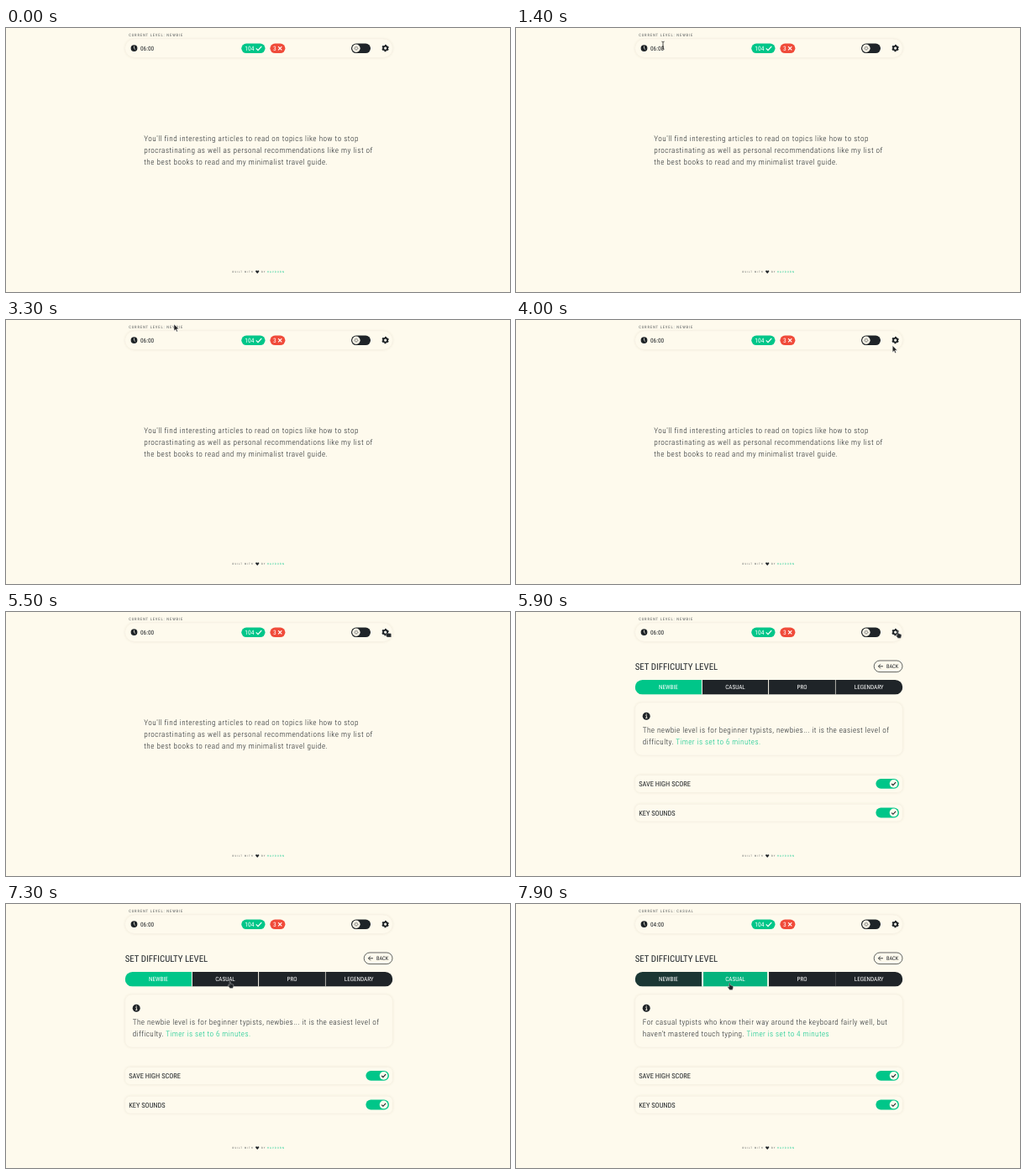
An HTML page for the animation above (8 s loop, 600x315 px).

```html
<!DOCTYPE html>
<html lang="en">
<head>
<meta charset="utf-8">
<title>Typing trainer</title>
<style>
  html, body { margin: 0; width: 100%; height: 100%; overflow: hidden; background: #fefaed; }
  svg { display: block; width: 100vw; height: 100vh; }
  text {
    font-family: "Roboto Condensed", Roboto, sans-serif;
    font-stretch: condensed;
    text-rendering: geometricPrecision;
    white-space: pre;
  }
</style>
</head>
<body>
<svg id="stage" viewBox="0 0 600 315"></svg>
<script>
const LOOP = 8000, STEP = 100;
const CREAM = '#fefaed', DARK = '#1f2428', GREY = '#565a5b', GREEN = '#00c689', RED = '#f04b3a';
const FAMILY = '"Roboto Condensed", Roboto, sans-serif';

// Where no condensed face is available, all text shares one narrowing factor.
function condenseFactor() {
  const ctx = document.createElement('canvas').getContext('2d');
  const width = font => { ctx.font = font; return ctx.measureText('procrastinating').width; };
  return width('condensed 40px ' + FAMILY) < 0.95 * width('40px Roboto, sans-serif') ? 1 : 0.88;
}
const narrow = condenseFactor();

function text(x, y, content, { size = 7.2, gap = 0, weight = 400, fill = DARK, anchor = 'start', id = '' } = {}) {
  return `<text id="${id}" transform="translate(${x} ${y}) scale(${narrow} 1)" font-size="${size}"
    letter-spacing="${gap / narrow}" font-weight="${weight}" fill="${fill}" text-anchor="${anchor}">${content}</text>`;
}
const rect = (x, y, w, h, r, attrs) =>
  `<rect x="${x}" y="${y}" width="${w}" height="${h}" rx="${r}" ${attrs}/>`;
const circle = (x, y, r, attrs) => `<circle cx="${x}" cy="${y}" r="${r}" ${attrs}/>`;
const line = (d, color, width, attrs = '') =>
  `<path d="${d}" fill="none" stroke="${color}" stroke-width="${width}" ${attrs}/>`;
const panel = (y, h, r) =>
  rect(141.7, y, 318.6, h, r, `fill="${CREAM}" stroke="#f5efe1" stroke-width=".5" filter="url(#soft)"`);

function header() {
  const rays = Array.from({ length: 8 }, (_, i) =>
    `<path d="M0-2.3V-3.1" transform="rotate(${i * 45})"/>`).join('');
  return text(146.2, 10.3, '', { size: 4.6, gap: 0.87, fill: GREY, id: 'level' })
    + panel(13, 22.4, 11.2)
    + circle(152.5, 24.1, 3.9, `fill="${DARK}"`)
    + line('M152.5 21.6V24.3L154 25.5', CREAM, 0.75)
    + text(160, 26.8, '', { size: 7.3, id: 'clock' })
    + rect(280.3, 18.5, 28.2, 11.6, 5.8, `fill="${GREEN}"`)
    + text(284.3, 26.9, '104', { size: 7.5, fill: '#fff' })
    + line('M297.8 24.4L300 26.6L304.3 21.9', '#fff', 1.2)
    + rect(314.4, 18.5, 18, 11.6, 5.8, `fill="${RED}"`)
    + text(318, 26.9, '3', { size: 7.5, fill: '#fff' })
    + line('M324.1 22.1L328.3 26.3M328.3 22.1L324.1 26.3', '#fff', 1.2)
    + rect(411, 18.5, 23, 11.6, 5.8, `fill="${DARK}"`)
    + circle(416.9, 24.3, 4.7, `fill="${CREAM}"`)
    + `<g transform="translate(416.9 24.3)" fill="none" stroke="#3b3f42" stroke-width=".55">
        <circle r="1.6"/>${rays}</g>`
    + circle(451.6, 24.1, 2.5, `fill="none" stroke="${DARK}" stroke-width="1.9"`)
    + circle(451.6, 24.1, 3.5, `fill="none" stroke="${DARK}" stroke-width="1.5"
        stroke-dasharray="1.83" transform="rotate(15 451.6 24.1)"`);
}

const body = { size: 9.2, gap: 0.495, weight: 300 };
const info = { ...body, gap: 0.412 };

function home() {
  return [
    "You'll find interesting articles to read on topics like how to stop",
    'procrastinating as well as personal recommendations like my list of',
    'the best books to read and my minimalist travel guide.'
  ].map((row, i) => text(164.2, 135.2 + i * 13.65, row, body)).join('');
}

function settingRow(y, label) {
  return panel(y, 20.8, 6)
    + text(146.2, y + 13.3, label, { size: 8.4 })
    + rect(428.4, y + 4.3, 27.6, 11.9, 5.95, `fill="${GREEN}"`)
    + circle(449.6, y + 10.25, 4.9, `fill="${CREAM}"`)
    + line(`M447.2 ${y + 10.4}l1.7 1.7l3.2-3.5`, DARK, 1.1);
}

function settings() {
  const names = ['NEWBIE', 'CASUAL', 'PRO', 'LEGENDARY'];
  const tabs = names.map((name, i) =>
    rect(141.7 + i * 79.65, 80.9, 79.75, 17.7, 0, `id="tab${i}" fill="${DARK}"`)
    + text(181.4 + i * 79.6, 92.3, name, { fill: '#fff', anchor: 'middle' })).join('');
  return text(141.7, 68.9, 'SET DIFFICULTY LEVEL', { size: 10.9 })
    + rect(426.2, 58, 33.8, 13.6, 6.8, `fill="none" stroke="${DARK}" stroke-width=".7"`)
    + line('M437 64.8H431.6M433.9 62.3L431.4 64.8L433.9 67.3', DARK, 0.85)
    + text(440.9, 67.1, 'BACK', { size: 6.4 })
    + `<g clip-path="url(#tabShape)">${tabs}
        <g id="splits" stroke="${CREAM}"><path d="M221.4 80V99M300.6 80V99"/><path d="M380.4 80V99" stroke-width=".6"/></g>
        <path id="frame" d="M222.1 80V99M300.1 80V99" stroke="${CREAM}" stroke-width="1.9"/></g>`
    + panel(108, 63, 8)
    + circle(155.2, 124.2, 4.5, `fill="${DARK}"`)
    + line('M154.3 123.6H155.4V126.4M154.1 126.4H156.4', CREAM, 0.85)
    + circle(155.2, 121.9, 0.65, `fill="${CREAM}"`)
    + text(150.8, 143.8, '', { ...info, id: 'info0' })
    + text(150.8, 158.4, '', { ...info, id: 'info1' })
    + settingRow(194.6, 'SAVE HIGH SCORE')
    + settingRow(229.2, 'KEY SOUNDS');
}

function footer() {
  const tiny = { size: 3.1, gap: 1.1, fill: GREY };
  return text(269.6, 292.2, 'BUILT WITH', tiny)
    + `<path d="M299.2 293L297.4 291.1C296.3 289.8 298.2 288.5 299.2 289.9C300.2 288.5 302.1 289.8 301 291.1Z" fill="${DARK}"/>`
    + text(304, 292.2, 'BY', tiny)
    + text(310.9, 292.2, 'HAVDORN', { ...tiny, gap: 1.25, fill: GREEN });
}

const pointers = `
  <path id="arrow" d="M0 0V8L1.9 6.3L3.1 9.1L4.4 8.5L3.2 5.8H5.7Z" fill="#222" stroke="#fff" stroke-width=".5"/>
  <path id="beam" d="M-1.6 0Q0 0 0 1Q0 0 1.6 0M0 1V8M-1.6 9Q0 9 0 8Q0 9 1.6 9M-.8 5.8H.8" fill="none" stroke="#222" stroke-width=".8"/>
  <path id="hand" d="M2 .8Q2.7 0 3.3 .8V3.2Q4.1 2.8 4.5 3.5Q5.3 3.1 5.7 3.9Q6.8 3.7 6.8 4.8V6.2L6 8.6H2.6L.3 5.4Q.2 4.3 1.2 4.7L2 5.4Z" fill="#24282b" stroke="#ddd" stroke-width=".4"/>
  <path id="press" d="M1.2 2.6Q1.8 2 2.4 2.9H5.6Q6.6 3 6.6 4V7.4H1.6L.4 5.6Z" fill="#24282b" stroke="#ddd" stroke-width=".3"/>`;
const shapes = ['arrow', 'beam', 'hand', 'press'];

const stage = document.getElementById('stage');
stage.innerHTML = `<defs>
    <filter id="soft" x="-10%" y="-30%" width="120%" height="160%">
      <feDropShadow dx="0" dy="0" stdDeviation="1.1" flood-color="#8a7a55" flood-opacity=".17"/>
    </filter>
    <clipPath id="tabShape">${rect(141.7, 80.9, 318.6, 17.7, 8.85, '')}</clipPath>
  </defs>
  ${rect(0, 0, 600, 315, 0, `fill="${CREAM}"`)}
  ${header()}<g id="home">${home()}</g><g id="settings">${settings()}</g>${footer()}
  <g id="pointer">${pointers}</g>`;

const $ = id => document.getElementById(id);
const show = (id, on) => $(id).setAttribute('display', on ? 'inline' : 'none');

// time, x, y, pointer shape from that time on
const track = [
  [100, 62, 28, 'arrow'], [500, 181, 68, 'arrow'], [600, 181, 68, 'arrow'],
  [800, 208, 118, 'arrow'], [1000, 208, 118, 'arrow'], [1300, 182, 34, 'arrow'],
  [1400, 175, 16.2, 'beam'], [1700, 167, 20, 'beam'], [1900, 159, 28, 'arrow'],
  [2200, 153, 14, 'arrow'], [2400, 162, 3.2, 'beam'], [2700, 200.5, 4, 'beam'],
  [3000, 200.5, 4, 'beam'], [3100, 197, 4.6, 'beam'], [3300, 200, 5, 'arrow'],
  [3400, 200, 5, 'arrow'], [3700, 314.4, 27, 'arrow'], [3800, 314.4, 27, 'arrow'],
  [4000, 448.2, 30.4, 'arrow'], [4300, 453, 22.5, 'arrow'], [4500, 452, 22.6, 'hand'],
  [5300, 452, 22.6, 'press'], [5900, 452, 22.6, 'hand'],
  [6200, 452, 22.6, 'arrow'], [6400, 322, 62, 'arrow'], [6500, 238.5, 77.4, 'hand'],
  [6700, 203, 91, 'hand'], [7100, 224, 87, 'hand'], [7300, 264, 92, 'hand'],
  [7400, 251.7, 93.8, 'hand'], [LOOP, 251.7, 93.8, 'hand']
];

function drawPointer(t) {
  show('pointer', t >= track[0][0]);
  const next = track.findIndex(key => key[0] > t);
  if (next < 1) return;
  const [t0, x0, y0, shape] = track[next - 1], [t1, x1, y1] = track[next];
  const k = (t - t0) / (t1 - t0);
  $('pointer').setAttribute('transform', `translate(${x0 + (x1 - x0) * k} ${y0 + (y1 - y0) * k})`);
  for (const name of shapes) show(name, name === shape);
}

function mix(from, to, k) {
  const part = (hex, i) => parseInt(hex.slice(1 + 2 * i, 3 + 2 * i), 16);
  return `rgb(${[0, 1, 2].map(i => Math.round(part(from, i) * (1 - k) + part(to, i) * k))})`;
}

function setLevel(casual) {
  const timer = (minutes, end) => `<tspan fill="${GREEN}">Timer is set to ${minutes} minutes${end}</tspan>`;
  $('level').textContent = 'CURRENT LEVEL: ' + (casual ? 'CASUAL' : 'NEWBIE');
  $('clock').textContent = casual ? '04:00' : '06:00';
  $('info0').textContent = casual
    ? 'For casual typists who know their way around the keyboard fairly well, but'
    : 'The newbie level is for beginner typists, newbies... it is the easiest level of';
  $('info1').innerHTML = casual
    ? "haven't mastered touch typing. " + timer(4, '')
    : 'difficulty. ' + timer(6, '.');
  show('splits', !casual);
  show('frame', casual);
}

let shownLevel = null;
function render(time) {
  const t = Math.floor((time % LOOP) / STEP) * STEP;
  const inSettings = t >= 5900, casual = t >= 7800;
  show('home', !inSettings);
  show('settings', inSettings);
  if (casual !== shownLevel) setLevel(shownLevel = casual);
  const fade = casual ? Math.min(0.88, 0.4 + (t - 7800) * 0.0048) : 0;
  $('tab0').setAttribute('fill', mix(GREEN, DARK, fade));
  $('tab1').setAttribute('fill', mix(DARK, GREEN, fade));
  drawPointer(t);
}

const start = performance.now();
function tick() {
  render(performance.now() - start);
  requestAnimationFrame(tick);
}
tick();
</script>
</body>
</html>
```
